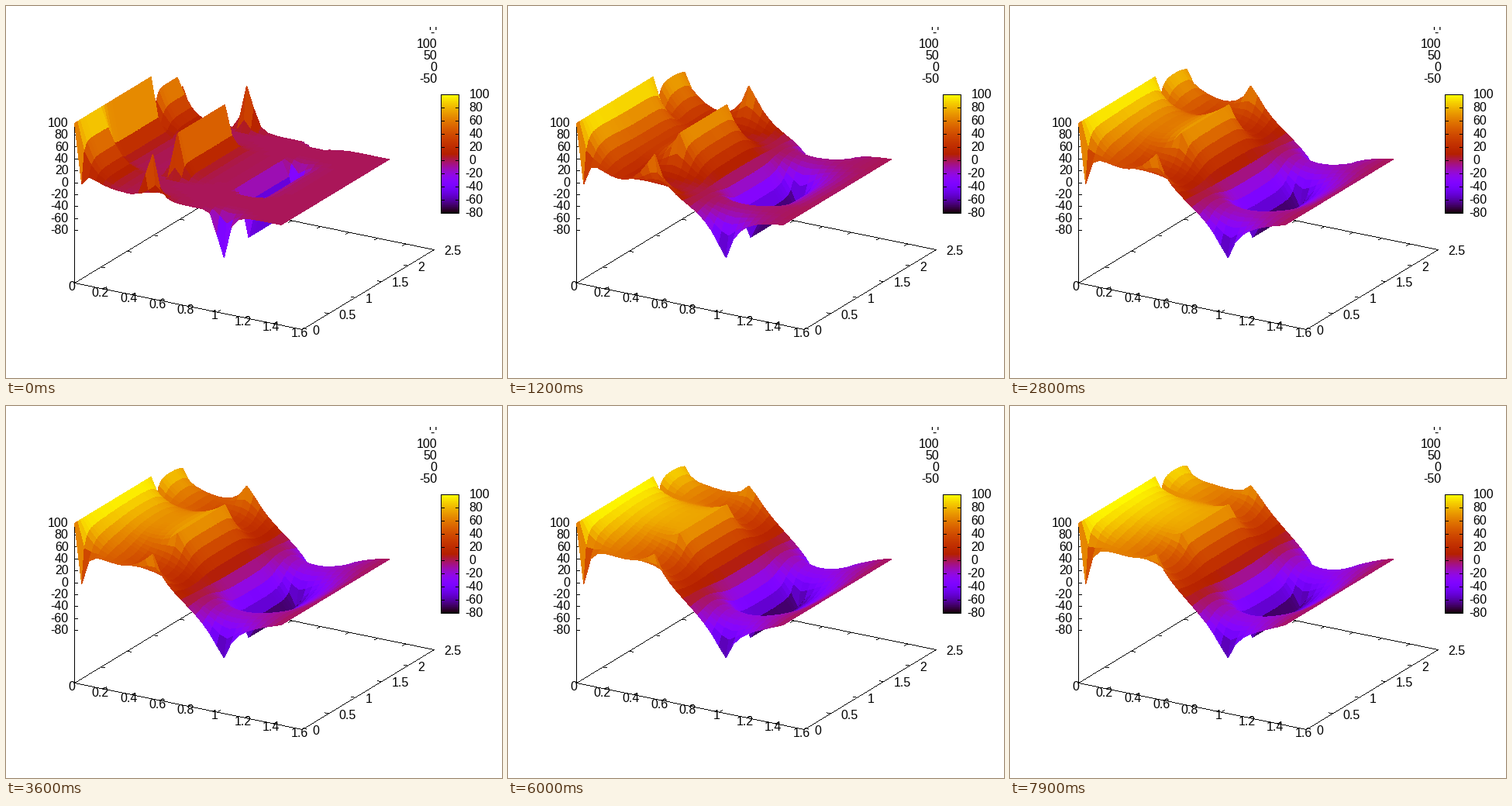
Animation of 640 by 480 pixels, one loop 8 s. Source, as a matplotlib script:

```python
import numpy as np
import matplotlib.pyplot as plt
from matplotlib.animation import FuncAnimation
from matplotlib.collections import PolyCollection
from matplotlib.colors import ListedColormap, Normalize

W, H, DPI = 640, 480, 80
FRAMES, INTERVAL = 80, 100
NX, NY = 30, 42              # grid nodes, spacing 0.05
PX = 72 / DPI                # one pixel in points

plt.rcParams["font.family"] = "Liberation Sans"


def make_palette(n=256):
    t = np.linspace(0, 1, n)
    blue = np.clip(np.sin(2 * np.pi * t), 0, 1)
    return ListedColormap(np.column_stack([np.sqrt(t), t ** 3, blue]))


def electrodes():
    """Flat indices of the nodes held at a constant potential."""
    held = {k: 100.0 for k in range(30)}
    held.update({30: 0.0, NY: 0.0})
    held.update({k: 0.0 for k in range((NX - 1) * NY, NX * NY)})
    for row, volts in ((10, 75.0), (20, -75.0)):
        for j in (-1, *range(12, 31), NY):
            held[row * NY + j] = volts
    return held


def relax():
    """Gauss-Seidel relaxation, one sweep per frame.

    The rows lie end to end, so the end of each row meets the next one.
    """
    held = electrodes()
    u = [0.0] * (NX * NY)
    for i in range(NX):
        for j in range(1, 12):
            u[i * NY + j] = 68 * 0.54 ** (i - 1)
        for j in range(31, NY - 1):
            u[i * NY + j] = 76 * 0.54 ** i
    for k, volts in held.items():
        u[k] = volts
    free = [k for k in range(NX * NY) if k not in held]

    states = []
    for _ in range(FRAMES):
        for k in free:
            west = u[k - NY] if k >= NY else 100.0
            north = u[k + 1] if k != NY - 1 else u[k - 1]
            u[k] = (west + u[k + NY] + u[k - 1] + north) / 4
        states.append(np.array(u).reshape(NX, NY))
    return states


def project(x, y, z=None):
    """Screen position; without z the point lies on the base plane."""
    drop = 357 if z is None else 227.5 - 0.7667 * z
    return 88 + 183.75 * x + 68 * y, drop + 37.5 * x - 41.2 * y


def corners(a):
    return np.stack([a[:-1, :-1], a[1:, :-1], a[1:, 1:], a[:-1, 1:]], axis=-1)


def far_to_near(a):
    """Order the cells from the back of the scene to the front."""
    a = np.swapaxes(a, 0, 1)[::-1]
    return a.reshape((-1,) + a.shape[2:])


GX, GY = np.meshgrid(np.arange(NX) * 0.05, np.arange(NY) * 0.05, indexing="ij")


def mesh(z):
    sx, sy = project(GX, GY, z)
    quads = np.stack([corners(sx), corners(sy)], axis=-1)
    return far_to_near(quads), far_to_near(corners(z).mean(axis=-1))


fig = plt.figure(figsize=(W / DPI, H / DPI), dpi=DPI, facecolor="white")
ax = fig.add_axes([0, 0, 1, 1])
ax.axis("off")
palette, scale = make_palette(), Normalize(-80, 100)
canvas = np.ones((H, W, 4))


def line(p, q):
    """Hard one-pixel line."""
    n = int(max(abs(q[0] - p[0]), abs(q[1] - p[1])) + 0.5) + 1
    cols = np.floor(np.linspace(p[0], q[0], n) + 0.5).astype(int)
    rows = np.floor(np.linspace(p[1], q[1], n) + 0.5).astype(int)
    canvas[rows, cols, :3] = 0


def tick(p, dx, dy):
    line(p, (p[0] + dx, p[1] + dy))


def label(x, y, text, ha):
    ax.text(x, y + 5.7, text, ha=ha, va="baseline", fontsize=16 * PX,
            color="black", zorder=5)


def draw_axes():
    base = [project(*c) for c in ((0, 0), (1.6, 0), (1.6, 2.5), (0, 2.5))]
    for p, q in zip(base, base[1:] + base[:1]):
        line(p, q)
    line((88, 357), (88, 151))

    for k in range(9):
        x = 0.2 * k
        tick(project(x, 0), 4, -2.4)
        tick(project(x, 2.5), -4, 2.4)
        label(84.5 + 36.75 * k, 361 + 7.45 * k, f"{x:g}", "center")
    for k in range(6):
        y = 0.5 * k
        tick(project(0, y), 5, 1)
        tick(project(1.6, y), -5, -1)
        label(395 + 34 * k, 418 - 20.6 * k, f"{y:g}", "left")
    for z in range(-80, 101, 20):
        y = 227.5 - 0.7667 * z
        tick((88, y), 4, 0)
        label(80, y - 1, str(z), "right")


def draw_key():
    for k, text in enumerate(("'-'", "100", "50", "0", "-50")):
        label(556, 33 + 15 * k, text, "right")


def draw_colorbar():
    left, right, top, bottom = 561, 584, 114, 267
    ramp = np.linspace(100, -80, bottom - top + 1)
    canvas[top:bottom + 1, left:right + 1] = palette(scale(ramp))[:, None]
    for y in (top, bottom):
        line((left, y), (right, y))
    for x in (left, right):
        line((x, top), (x, bottom))
    for k in range(10):
        value, y = 100 - 20 * k, top + 17 * k
        tick((left, y), 4, 0)
        tick((right, y), -4, 0)
        label(592 if value < 0 else 597, y - 1, str(value), "left")


draw_axes()
draw_key()
draw_colorbar()
ax.imshow(canvas, extent=(-0.5, W - 0.5, H - 0.5, -0.5), aspect="auto",
          interpolation="nearest", zorder=1)
ax.set_xlim(-0.5, W - 0.5)
ax.set_ylim(H - 0.5, -0.5)

states = relax()
surface = PolyCollection([], cmap=palette, norm=scale, edgecolors="none",
                         linewidths=0, antialiaseds=False, zorder=2)
ax.add_collection(surface, autolim=False)


def update(n):
    quads, level = mesh(states[n])
    surface.set_verts(quads)
    surface.set_array(level)
    return (surface,)


anim = FuncAnimation(fig, update, frames=FRAMES, interval=INTERVAL,
                     repeat=True, repeat_delay=0, init_func=lambda: update(0))
plt.show()
```
